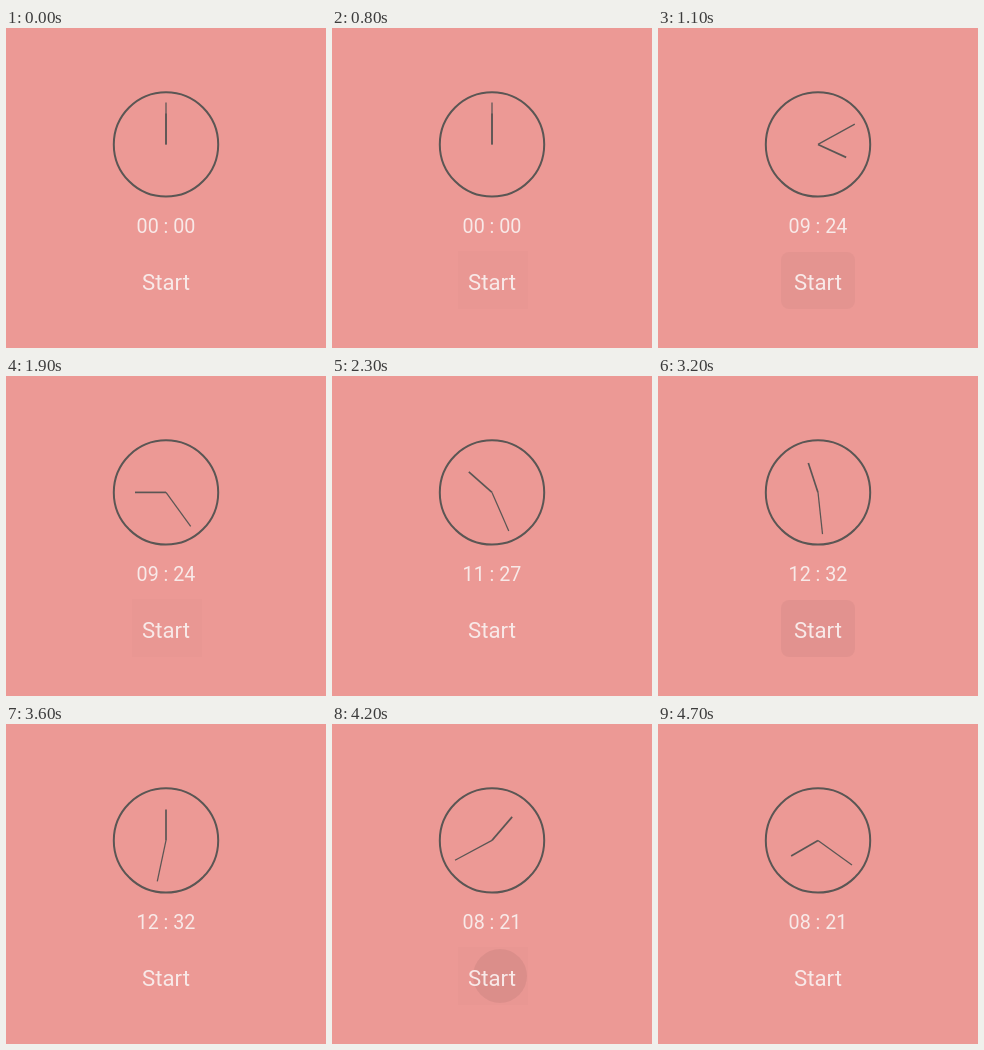
These frames come from a looping animation (320 by 320 pixels, 4.9 s). An HTML page:

```html
<!DOCTYPE html>
<html lang="en">
<head>
<meta charset="utf-8">
<title>Clock</title>
<style>
  html, body { margin: 0; width: 100%; height: 100%; overflow: hidden; background: #ec9995; }
  svg { display: block; width: 100%; height: 100%; }
  .clock { fill: none; stroke: #5b5654; }
  text { font-family: Roboto, sans-serif; fill: #f8e9e8; text-anchor: middle; }
</style>
</head>
<body>
<svg viewBox="0 0 320 320">
  <clipPath id="button"><rect x="123" y="224" width="74" height="57" rx="8"/></clipPath>
  <rect id="press" x="126" y="223" width="70" height="58" opacity="0"/>
  <g clip-path="url(#button)"><circle id="ripple" cx="168" cy="252" r="0"/></g>
  <g class="clock" transform="translate(160 116.4)">
    <circle r="52.2" stroke-width="2"/>
    <path id="hour" d="M0 0V-31" stroke-width="1.7"/>
    <path id="minute" d="M0 0V-42" stroke-width="1.25"/>
  </g>
  <text id="time" x="160" y="205" font-size="19.7" xml:space="preserve">00 : 00</text>
  <text x="160" y="261.6" font-size="22.2">Start</text>
</svg>
<script>
const LOOP = 4900, STEP = 100, SWEEP = 520;
const taps = [
  { at: 879, h: 9, m: 24 },
  { at: 1940, h: 11, m: 27 },
  { at: 2995, h: 12, m: 32 },
  { at: 4112, h: 8, m: 21 }
];
const el = id => document.getElementById(id);
const clamp = x => Math.min(1, Math.max(0, x));
const pad = n => String(n).padStart(2, '0');
const [press, ripple, hour, minute, time] = ['press', 'ripple', 'hour', 'minute', 'time'].map(el);

// Hands always travel clockwise.
const sweep = (from, to, p) => from + ((to - from + 720) % 360) * p;
const rotate = (hand, angle) => hand.setAttribute('transform', `rotate(${angle})`);

function draw(t) {
  let h = 0, m = 0, label = '00 : 00', pressed = 0, radius = 0, shade = 0;
  for (const tap of taps) {
    const age = t - tap.at;
    if (age > -85 && age < 200) pressed = 0.01;
    if (age < 0) break;
    const p = clamp(age / SWEEP);
    h = sweep(h, tap.h * 30, p);
    m = sweep(m, tap.m * 6, p);
    label = `${pad(tap.h)} : ${pad(tap.m)}`;
    radius = 5 + age * 0.25;
    shade = 0.06 * clamp((290 - age) / 115);
  }
  rotate(hour, h);
  rotate(minute, m);
  time.textContent = label;
  press.setAttribute('opacity', pressed);
  ripple.setAttribute('r', radius);
  ripple.setAttribute('opacity', shade);
}

function tick() {
  const t = performance.now() % LOOP;
  draw(Math.floor(t / STEP) * STEP);
  requestAnimationFrame(tick);
}
tick();
</script>
</body>
</html>
```
